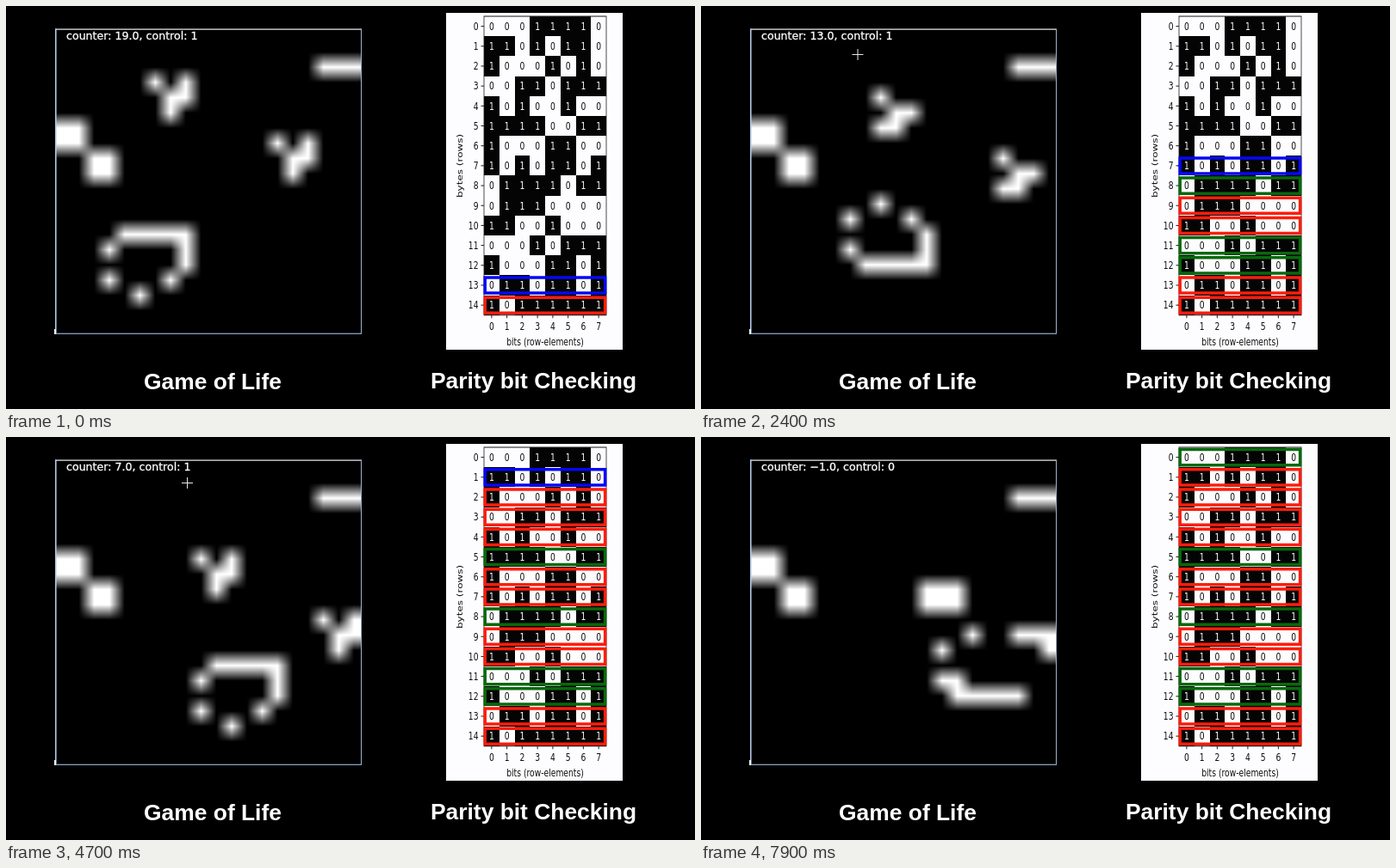
Recreate the animation shown at these times as an HTML page with a canvas. Size 800x469 px, loop 8000 ms.

```html
<!DOCTYPE html>
<html lang="en">
<head>
<meta charset="utf-8">
<title>Game of Life and parity bits</title>
<style>
  html, body { margin: 0; width: 100%; height: 100%; overflow: hidden; background: #000; }
  #board { position: absolute; left: 58px; top: 27px; }
  svg { position: absolute; left: 0; top: 0; }
  .title { font: bold 26.4px "Liberation Sans", Arial, sans-serif; fill: #fff; text-anchor: middle; }
  .status { font: 12.6px "DejaVu Sans", sans-serif; fill: #fff; stroke: #fff; stroke-width: 0.3; }
  .plot text { font: 9.2px "DejaVu Sans", sans-serif; fill: #111; text-anchor: middle; }
  .plot .one { fill: #fff; }
  .plot .row { text-anchor: end; }
  .plot .cell { fill: #040404; shape-rendering: crispEdges; }
  .mark { fill: none; stroke-width: 3.5; vector-effect: non-scaling-stroke; }
</style>
</head>
<body>
<canvas id="board" width="355" height="354"></canvas>
<svg id="stage" width="800" height="469" viewBox="0 0 800 469"></svg>
<script>
const LOOP = 8000, FRAME = 100, STEP = 410, LEAD = 350;
const N = 20, LAST = 18, END = 20, CELL = 17.75, STRETCH = 1.306;
const BYTES = [
  '00011110', '11010110', '10001010', '00110111', '10100100',
  '11110011', '10001100', '10101101', '01111011', '01110000',
  '11001000', '00010111', '10001101', '01101101', '10111111'
];
// time, x, y of the cross-hair
const POINTER = [
  [300, 262, 330], [900, 220.5, 212.5], [1800, 136.5, 44.5], [3000, 227.5, 68.5],
  [4700, 210.5, 53.5], [6600, 323.5, 281.5], [7200, 372.5, 371.5]
];

const stage = document.getElementById('stage');
const board = document.getElementById('board');
const ctx = board.getContext('2d');

function add(parent, tag, attrs, text) {
  const el = document.createElementNS('http://www.w3.org/2000/svg', tag);
  for (const key in attrs) el.setAttribute(key, attrs[key]);
  if (text !== undefined) el.textContent = text;
  parent.appendChild(el);
  return el;
}

// ---- Life ----
const at = (x, y) => y * N + x;

function place(grid, x, y, pattern) {
  pattern.split('/').forEach((line, j) => [...line].forEach((c, i) => {
    if (c === 'X') grid[at(x + i, y + j)] = 1;
  }));
}

function nextCell(grid, x, y) {
  const alive = grid[at(x, y)];
  let sum = -alive;
  for (let j = Math.max(0, y - 1); j <= Math.min(N - 1, y + 1); j++)
    for (let i = Math.max(0, x - 1); i <= Math.min(N - 1, x + 1); i++)
      sum += grid[at(i, j)];
  return sum === 3 || (alive && sum === 2) ? 1 : 0;
}

const evolve = grid => grid.map((_, k) => nextCell(grid, k % N, Math.floor(k / N)));

function makeStates() {
  const first = new Uint8Array(N * N);
  const glider = 'X.X/.XX/.X.';
  place(first, 6, 3, glider);
  place(first, 14, 7, glider);
  place(first, 17, 2, 'XXX');
  place(first, 0, 6, 'XX../XX../..XX/..XX');
  place(first, 3, 13, '.XXXXX/X....X/.....X/X...X./..X...');
  const list = [first];
  while (list.length <= LAST) list.push(evolve(list[list.length - 1]));
  // at the end only a few cells still update, one after another
  const end = list[LAST].slice();
  for (const [x, y] of [[13, 9], [11, 7], [11, 8], [18, 11], [13, 14]])
    end[at(x, y)] = nextCell(end, x, y);
  list[END] = end;
  return list;
}

function paint(grid) {
  const { width: w, height: h } = board;
  const img = ctx.createImageData(w, h);
  const locate = (p, size) => {
    const u = Math.min(N - 1, Math.max(0, (p + 0.5) * N / size - 0.5));
    const a = Math.floor(u);
    return [a, Math.min(N - 1, a + 1), u - a];
  };
  for (let y = 0, k = 0; y < h; y++) {
    const [y0, y1, v] = locate(y, h);
    for (let x = 0; x < w; x++, k += 4) {
      const [x0, x1, u] = locate(x, w);
      const top = grid[at(x0, y0)] * (1 - u) + grid[at(x1, y0)] * u;
      const low = grid[at(x0, y1)] * (1 - u) + grid[at(x1, y1)] * u;
      const c = 255 * (top * (1 - v) + low * v);
      img.data[k] = img.data[k + 1] = img.data[k + 2] = c;
      img.data[k + 3] = 255;
    }
  }
  ctx.putImageData(img, 0, 0);
}

// ---- Left panel ----
function block(x, y, width, height, fill) {
  add(stage, 'rect', { x, y, width, height, fill });
}
block(57, 26.5, 356, 1.2, '#f4f6fa');
block(57, 26.5, 1.6, 355, '#b0c8e4');
block(412, 27, 1, 354, '#9db4d4');
block(57, 380.7, 356, 1.2, '#94add2');
block(56, 376, 2, 6, '#e8f0f8');
const status = add(stage, 'text', { class: 'status', x: 70, y: 39.3 });
const cross = add(stage, 'path', { d: 'M-6.5 0H6.5M0 -6.5V6.5', stroke: '#e6e6e6' });
add(stage, 'text', { class: 'title', x: 240, y: 446 }, 'Game of Life');
add(stage, 'text', { class: 'title', x: 612.5, y: 445 }, 'Parity bit Checking');

// ---- Right panel ----
block(511, 8, 205, 392, '#fdfcfe');
const plot = add(stage, 'g', { class: 'plot', transform: `translate(555 12) scale(1 ${STRETCH})` });
const label = (x, y, text, cls = '') => add(plot, 'text', { x, y, dy: '.36em', class: cls }, text);
const W = 8 * CELL, H = BYTES.length * CELL;

BYTES.forEach((byte, r) => {
  const mid = (r + 0.5) * CELL;
  [...byte].forEach((bit, c) => {
    if (bit === '1') add(plot, 'rect', {
      class: 'cell', x: c * CELL, y: r * CELL, width: CELL, height: CELL
    });
    label((c + 0.5) * CELL, mid, bit, bit === '1' ? 'one' : '');
  });
  add(plot, 'path', { d: `M-3.5 ${mid}H0`, stroke: '#222', 'stroke-width': 0.8 });
  label(-6.5, mid, r, 'row');
});
for (let c = 0; c < 8; c++) {
  const mid = (c + 0.5) * CELL;
  add(plot, 'path', { d: `M${mid} ${H}v2.7`, stroke: '#222', 'stroke-width': 1 });
  label(mid, H + 10.2, c);
}
add(plot, 'rect', { width: W, height: H, fill: 'none', stroke: '#222', 'stroke-width': 0.8 });
label(W / 2, H + 23.8, 'bits (row-elements)');
add(plot, 'text', { transform: `translate(-28.5 ${H / 2}) rotate(-90)`, dy: '.36em' }, 'bytes (rows)');

const marks = BYTES.map((byte, r) => {
  const frame = add(plot, 'rect', {
    class: 'mark', x: 1.2, y: r * CELL + 2, width: W - 2.6, height: CELL - 3.9
  });
  const odd = byte.replace(/0/g, '').length % 2;
  return { frame, result: odd ? '#fb1d0b' : '#0a680d' };
});

// ---- Playback ----
const states = makeStates();
let shown = -1;

function showStep(step) {
  paint(states[step] || states[LAST]);
  const count = 19 - step;
  const value = (count < 0 ? '\u2212' : '') + Math.abs(count).toFixed(1);
  status.textContent = `counter: ${value}, control: ${count < 0 ? 0 : 1}`;
  const current = 13 - step;
  marks.forEach(({ frame, result }, r) => {
    frame.setAttribute('visibility', r < current ? 'hidden' : 'visible');
    frame.setAttribute('stroke', r === current ? '#0508f5' : result);
  });
}

function showPointer(t) {
  const next = POINTER.findIndex(p => p[0] >= t);
  const visible = next > 0;
  cross.setAttribute('visibility', visible ? 'visible' : 'hidden');
  if (!visible) return;
  const [t0, x0, y0] = POINTER[next - 1], [t1, x1, y1] = POINTER[next];
  const k = (t - t0) / (t1 - t0), e = k * k * (3 - 2 * k);
  cross.setAttribute('transform', `translate(${x0 + (x1 - x0) * e} ${y0 + (y1 - y0) * e})`);
}

const start = performance.now();
function tick() {
  const now = Math.max(0, performance.now() - start) % LOOP;
  const t = Math.floor(now / FRAME) * FRAME;
  const step = Math.floor((t + LEAD) / STEP);
  if (step !== shown) showStep(shown = step);
  showPointer(t);
  requestAnimationFrame(tick);
}
tick();
</script>
</body>
</html>
```
